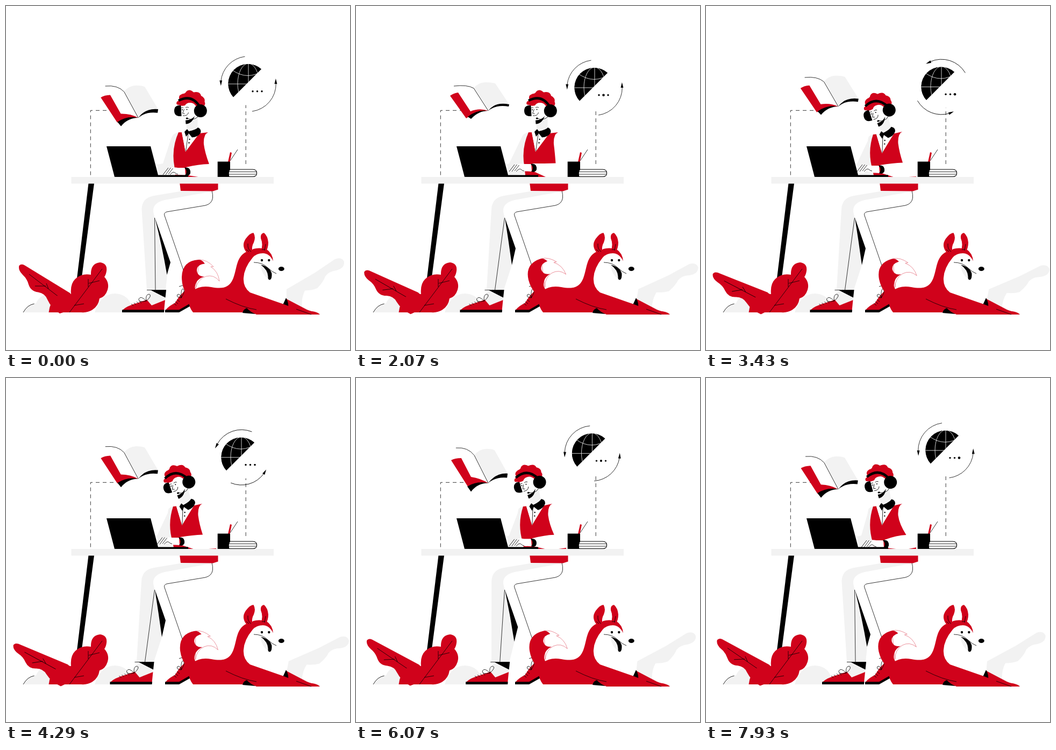
An HTML page for the animation above (8 s loop, 640x640 px).

```html
<!DOCTYPE html>
<html lang="en">
<head>
<meta charset="utf-8">
<title>Desk work</title>
<style>
html, body { margin: 0; width: 100%; height: 100%; overflow: hidden; background: #fff; }
svg { display: block; width: 100%; height: 100%; }
.r { fill: #d0021b; }
.k { fill: #000; }
.g { fill: #f2f2f2; }
.w { fill: #fff; }
.l { fill: none; stroke: #000; stroke-width: .8; }
.wl { fill: none; stroke: #fff; stroke-width: .8; }
</style>
</head>
<body>
<svg viewBox="0 0 640 640">
  <defs><clipPath id="half"><path d="M-27.2 25.2A37.1 37.1 0 0 1 25.2 -27.2Z"/></clipPath></defs>

  <path class="l" stroke-dasharray="7 6" d="M200 194.300H157.300V318M446.200 183V300"/>

  <g id="globe">
    <circle class="w" r="40"/>
    <g clip-path="url(#half)" transform="translate(-1 -.5)">
      <circle class="k" r="37.100"/>
      <path class="wl" d="M-40 .5H40M1 -40V40M-30 -26Q0 -4 30 -26"/>
      <ellipse class="wl" cx="1" rx="20" ry="37.500"/>
    </g>
    <g id="dots">
      <circle class="k" cx="8" cy="13.800" r="1.700"/>
      <circle class="k" cx="16.500" cy="13.800" r="1.700"/>
      <circle class="k" cx="25" cy="13.800" r="1.700"/>
    </g>
    <g id="arrows">
      <path class="l" d="M-6.500 -51A51.400 51.400 0 0 0 -51.200 -5M7 51A51.400 51.400 0 0 0 51.300 -1"/>
      <path class="k" d="M-51.200 3.500L-53.700 -6.500H-48.800ZM50.900 -10L48.500 0H53.400Z"/>
    </g>
  </g>

  <g id="book">
    <path id="cover" class="r"/><path id="pageL" class="l"/><path id="pageR" class="g"/>
    <path id="edges" class="k"/><path id="spine" class="l"/>
  </g>

  <path class="g" d="M32 570Q38 553 56 553Q62 539 76 537L130 570ZM165 570Q176 535 203 535Q222 536 230 550L240 570Z"/>
  <path class="l" d="M32 570Q40 556 52.500 554"/>
  <path class="k" d="M153.500 330H164L140 512L131 515Z"/>

  <path id="farLeg" class="g"/>
  <path id="gap" class="k"/>
  <path id="seam" class="l"/>
  <path class="l" d="M383 344Q385 350 384.500 357Q383 368 371 371L299 383Q293 385 295 390L340 520"/>
  <path class="r" d="M323 328H394.500V341.500L385 344.500L325 344Z"/>

  <g id="foot">
    <path class="g" d="M268 530L261 548L271 557L296 547V541Z"/>
    <path class="k" d="M269 528.500H298L296.500 542.500Z"/>
    <path class="l" d="M262 528.500H298"/>
    <path class="r" d="M216.500 566Q224 558 246 552L262 546.500L271 557L296 547L294 567Z"/>
    <path class="k" d="M216 565.200H294.500L294 570H216Z"/>
    <path class="l" d="M261 549Q246 552 247 545Q251 538 261 549Q259 537 266 536Q273 538 261 549M233 554l4 4M238 552l4 4M243 550l4 4M248 549l4 4"/>
  </g>

  <path id="farArm" class="g"/>
  <g id="torso">
    <path class="r" d="M321 235Q307 266 313.500 300L316 325H372L378 292Q366 250 376 235L359 237L334 271L327 235Z"/>
    <path class="w" d="M327 235L334 271L359 238L356 230Z"/>
    <path class="l" d="M339 238L334.500 270"/>
    <circle class="k" cx="341.500" cy="248" r="1.200"/><circle class="k" cx="340.500" cy="254.500" r="1.200"/>
    <g id="head">
      <path class="g" d="M335 219Q346 220 351 205L357 207L356 228L337 232Z"/>
      <path class="w" d="M325 182L327 205Q329 216 338 214Q349 211 354 200L356 180Z"/>
      <path class="k" d="M334 212.500L334.500 219.500Q346 219 351 205Q344 213 334 212.500Z"/>
      <ellipse class="k" cx="336.800" cy="209" rx="2.200" ry="1.500"/>
      <path class="l" d="M337 209Q349 214 357 206M331.500 192L328.500 199.500L332.500 200.500M329 204Q338 205 339.500 198M325.500 190Q328 188 330 189.500M334 189Q337 187 340 189"/>
      <circle class="k" cx="328" cy="193" r="1"/><circle class="k" cx="336.500" cy="192.500" r="1"/>
      <path class="k" d="M325.500 184.500L326.500 205Q313 206 313 195Q313 184 325.500 184.500Z"/>
      <path class="r" d="M323 175Q319 167 328 163.500Q334 163 335 159.500Q341 153 349 160.500Q361 158 363 167Q371 171 369.500 178Q372 183 367 188L354 187Q349 179 342 180Q336 180 333 185Q326 187 322 184Q315 184 318 178Z"/>
      <path d="M321 176Q346 163 361 188" fill="none" stroke="#000" stroke-width="4.500"/>
      <circle class="k" cx="361.800" cy="195" r="12"/>
      <path class="k" d="M332 234L337 229L340 233Q354 230 357 226Q364 229 362 236Q357 244 346 244.500L340 237L335 243Z"/>
    </g>
  </g>
  <path id="arm" class="w"/>
  <path id="wedge" class="r" d="M0 0L14 -2.800V0Z"/>
  <g id="hand">
    <path class="w" d="M-5 -7L-18 -7Q-27 -9 -32 -6L-44 6L-33 7L-28 3Q-22 7 -12 6.500L-4 7Z"/>
    <path id="fingers" class="l" d="M-46 6L-36 -7M-41 6L-31.500 -7M-36 5L-27.500 -6M-33 6Q-27 -1 -24 2T-18 5"/>
    <path class="k" d="M-6 -7Q3 -9 5 -1Q6 7 -1 8L-5 7Q1 0 -6 -7Z"/>
  </g>

  <path class="k" d="M187 261H269L283 314.500H339V318H202Z"/>
  <path class="g" d="M121.500 318H498V330.500H121.500Z"/>
  <path d="M412 304H459Q466.500 304 466.500 311Q466.500 317.500 459 317.500H412" fill="#fff" stroke="#000" stroke-width="1.200"/>
  <path class="l" d="M414 308.500H465.500M414 313H465.500M417 288L431 267"/>
  <path class="r" d="M417 272L420 273L416.500 290H413Z"/>
  <path class="k" d="M393.700 289.500H417V304Q413 311 416 318H393.700Z"/>

  <g id="leaf">
    <path class="r" d="M34 482Q28 479 24.500 483Q22 491 31 500Q39 507 42 518Q46 531 60 532.500Q73 535 77 546Q84 562 100 572L140 560L119 534Z"/>
    <path class="l" d="M43 499L98 541M54 521H74M75 516L79 526"/>
  </g>
  <path class="r" d="M158 500Q157 479 175 477Q189 479 187 493Q186 500 183 504Q193 515 189 528Q185 541 174 544Q172 558 161 565Q152 571 140 570H79.500Q82 550 93 541Q102 533 121 536Q119 515 131 506Q142 497 158 500Z"/>
  <path class="l" d="M179 489L118 570M153 508V523M153.500 516L174 511M127 557L145 554"/>

  <path class="r" d="M296.500 566Q304 557 314 553L322 541L334 528L346 545V553L322 567Z"/>
  <path class="k" d="M296 565.200H322L345 552V557L322 570H296Z"/>
  <path class="l" d="M326 543Q316 542 319 537Q324 534 326 543Q325 528 329 526Q335 529 326 543M312 553l5 4M315 550l5 4M318 546l5 4M322 522L330 519.500"/>

  <g id="tail">
    <path d="M360 472Q374 472 386 485L381 485Q395 494 397 512Q387 499 372 503Q357 508 353 525Z" fill="#fff" stroke="#d0021b" stroke-width=".4"/>
    <path class="r" d="M350 548Q327 535 327 504Q328 474 358 472Q365 471.500 370 479.500Q355 481 355 492Q356 503 369 503.500Q353 508 351.500 523Q352 535 364 545Z"/>
  </g>

  <path id="backLeaf" class="g" d="M612 471Q625 466 629 476Q630 488 614 492Q600 494 594 503Q590 514 579 525Q570 529 556 529.500Q549 544 551 560L520 556L522 527L575 496Z"/>

  <path class="r" d="M518 543L560 565L584 574H520Z"/>
  <path class="w" d="M466 460Q440 480 441 520L454 534L515 557L522 545L520 500Q500 500 497 474Z"/>
  <path class="k" d="M515 556L521 543Q526 551 525 561ZM440 571Q441 562 448 560L464 573Z"/>
  <path class="r" d="M348 570Q340 560 340 549Q338 538 347 530Q361 519 382 523C404 527 416 524 423 506C430 488 428 466 448 457Q456 456 460 452Q470 449 484 452Q496 460 497 474.500Q490 460 478 460Q466 460 459 468Q443 487 442 506Q441 523 454 533L520 556L548 567Q578 566 584 574H466Q454 569 448 562Q443 563 440 570Z"/>
  <path class="r" d="M448 459Q437 446 446 433Q454 422 460.500 422Q465 430 461 440Q456 448 459 458ZM474 456Q479 444 474 432Q473 423 480 422Q487 428 488 440Q488 450 483 458Z"/>
  <path class="l" d="M450 442Q449 453 456 457M447 453L452 457M483 443L481 455M476 453L482 453M409 545Q440 561 466 565M540 564L568 574"/>
  <path class="g" d="M473 482Q476 500 488 508L489 495Z"/>
  <path class="k" d="M474 481.500Q491 485 494.500 498Q495 508 491 509.500Q487 510 487.500 503Q487 491 474 481.500Z"/>
  <path class="l" d="M461 477Q477 477 487 487Q494 494 503 498"/>
  <ellipse class="k" cx="512.300" cy="489" rx="5.500" ry="4"/>
  <ellipse id="eyeL" class="k" cx="476" cy="473" rx="2.200" ry="2.200"/>
  <ellipse id="eyeR" class="k" cx="489.300" cy="473" rx="2.200" ry="2.200"/>
</svg>
<script>
const LOOP = 8000;
const KEYS = [0, 1000, 2070, 3430, 5140, 7070, 7930];
const TRACKS = {
  globeX: [451, 448, 444, 438, 438, 442.5, 446],
  globeY: [145, 149, 152, 150.5, 144, 136.8, 134.8],
  bookY: [208, 204, 195, 187, 189, 204, 207],
  flap: [.65, .3, 0, .4, .9, 1, .75],
  leaf: [0, -3.6, -7.3, -9.8, -6.9, -.4, -2.9],
  backLeaf: [0, 2.8, 5.6, 7.4, 5.2, 0, 1.9],
  tail: [0, -8.5, -15, -12, -3.4, -16.5, -13.6],
  lean: [0, 0, 0, 1, 1, 1, 1],
  nod: [0, 0, 0, -10, -11, -6.5, -6.5],
  step: [0, .5, 1, 1, 1, 0, 0],
  elbowX: [378, 372, 371.5, 366, 366, 372, 372.5],
  elbowY: [294, 292.5, 292.5, 291.5, 291.5, 292, 292],
  cuffX: [338, 331, 331, 327, 327, 335, 335],
  cuffY: [308, 301, 301, 304, 304, 309, 309],
  type: [0, -4, 1, -2, 1, 0, 0],
  wedge: [0, 0, 0, .3, .4, 1, 1]
};

const $ = id => document.getElementById(id);
const set = (id, name, value) => $(id).setAttribute(name, value);
const move = (id, value) => set(id, 'transform', value);
const draw = (id, d) => set(id, 'd', d);
const clamp = x => Math.min(1, Math.max(0, x));
const smooth = x => (x = clamp(x), x * x * (3 - 2 * x));
const easeOut = x => 1 - (1 - clamp(x)) ** 5;

// Blends two paths that have the same commands.
function mix(a, b, k) {
  const num = /-?[\d.]+/g, ends = b.match(num);
  let i = 0;
  return a.replace(num, v => +v + (ends[i++] - v) * k);
}

// Cubic through the keys, level at every turning point.
function track(v, t) {
  const last = KEYS.length - 1;
  if (t >= KEYS[last]) return v[last];
  const slope = i => (v[i + 1] - v[i]) / (KEYS[i + 1] - KEYS[i]);
  const tangent = i => {
    if (i === 0) return slope(0);
    if (i === last) return slope(last - 1);
    const a = slope(i - 1), b = slope(i);
    return a * b <= 0 ? 0 : 2 * a * b / (a + b);
  };
  const i = KEYS.findIndex(k => k > t) - 1;
  const h = KEYS[i + 1] - KEYS[i], u = (t - KEYS[i]) / h, s = smooth(u);
  return v[i] * (1 - s) + v[i + 1] * s
    + h * u * (1 - u) * (tangent(i) * (1 - u) - tangent(i + 1) * u);
}

const BOOK = {
  cover: ['M175 -28Q182 -33 190 -34L213 1Q230 -6 246 0Q225 -1 205 14Z',
          'M177 -43Q184 -47 196 -47L214 -12Q232 -9 246 0Q226 -4 208 6Z'],
  pageL: ['M182 -46Q207 -49 219 -42', 'M186 -66Q208 -68 220 -52'],
  pageR: ['M219 -42Q226 -52 240 -53Q252 -53 259 -51L285 -12Q258 -17 246 0Z',
          'M220 -52Q228 -63 243 -64Q254 -64 258 -61L282 -18Q260 -19 246 0Z'],
  edges: ['M246 0Q258 -17 285 -12L284 -8Q260 -12 246 0Q228 0 214 15L208 11Q225 -3 246 0Z',
          'M246 0Q260 -19 282 -18L281 -10Q260 -12 246 0Q226 0 214 16L207 6Q226 -5 246 0Z'],
  spine: ['M219 -42L246 0', 'M220 -52L246 0']
};
const LEG = {
  farLeg: ['M323 345L275 353Q253 357 252.500 378L262 528L297 528L300 500L277 394Q271 378 277 371Q282 364 295 361L383 345Z',
           'M323 345L275 353Q253 357 252 378L243 528L275 528L290 482L277 394Q271 378 277 371Q282 364 295 361L383 345Z'],
  gap: ['M277 394L306 477L299.500 500Q290 445 277 394Z', 'M277 394L297 451L290 482Q284 438 277 394Z'],
  seam: ['M276.500 394L278 528', 'M276.500 394L258.500 528']
};

function drawArms(p) {
  const { cuffX: x, cuffY: y, elbowX: ex, elbowY: ey, lean } = p;
  const sx = 376 - 10.5 * lean, sy = 235 - 1.5 * lean, dx = -10 * lean, dy = 4 * lean;
  draw('farArm', `M${321 + dx} ${235 + dy}Q${311 + dx} ${236 + dy} ${307 + dx * .6} ${247 + dy}` +
    `L${x - 46} 293L281 295L284 315L318 312L${324 + dx} 280Z`);
  draw('arm', `M${sx} ${sy}Q${sx - 9} ${sy + 4} ${sx - 8} ${sy + 22}Q${sx - 6} ${sy + 38} ${ex} ${ey}` +
    `Q${x + 20} ${ey + .5} ${x - 3} ${y - 8}L${x} ${y + 7}L${x + 23} 318.500L391 319L396 260Z`);
  move('hand', `translate(${x} ${y})`);
  move('fingers', `translate(0 ${p.type})`);
  move('wedge', `translate(377 318) scale(1 ${p.wedge})`);
}

function render(t) {
  const p = {};
  for (const name in TRACKS) p[name] = track(TRACKS[name], t);

  move('globe', `translate(${p.globeX} ${p.globeY})`);
  move('arrows', `rotate(${-180 * easeOut((t - 2180) / 7000)})`);
  [...$('dots').children].forEach((dot, i) => {
    const away = Math.abs(t % 4300 - 950 - 1300 * i);
    dot.setAttribute('r', 1.7 + .65 * smooth(1 - away / 950));
  });

  move('book', `translate(0 ${p.bookY})`);
  for (const id in BOOK) draw(id, mix(...BOOK[id], p.flap));
  for (const id in LEG) draw(id, mix(...LEG[id], p.step));
  move('foot', `translate(${-22.5 * p.step} 0)`);

  move('torso', `rotate(${-5.6 * p.lean} 358 340)`);
  move('head', `rotate(${p.nod} 345 232)`);
  drawArms(p);

  move('leaf', `rotate(${p.leaf} 110 560)`);
  move('backLeaf', `rotate(${p.backLeaf} 525 560)`);
  move('tail', `rotate(${p.tail} 345 530)`);
  const blink = Math.min(Math.abs(t - 1000), Math.abs(t - 7070));
  const open = 1.2 + smooth(blink / 160);
  set('eyeL', 'ry', open);
  set('eyeR', 'ry', open);
}

const start = performance.now();
function tick() {
  render((performance.now() - start) % LOOP);
  requestAnimationFrame(tick);
}
tick();
</script>
</body>
</html>
```
